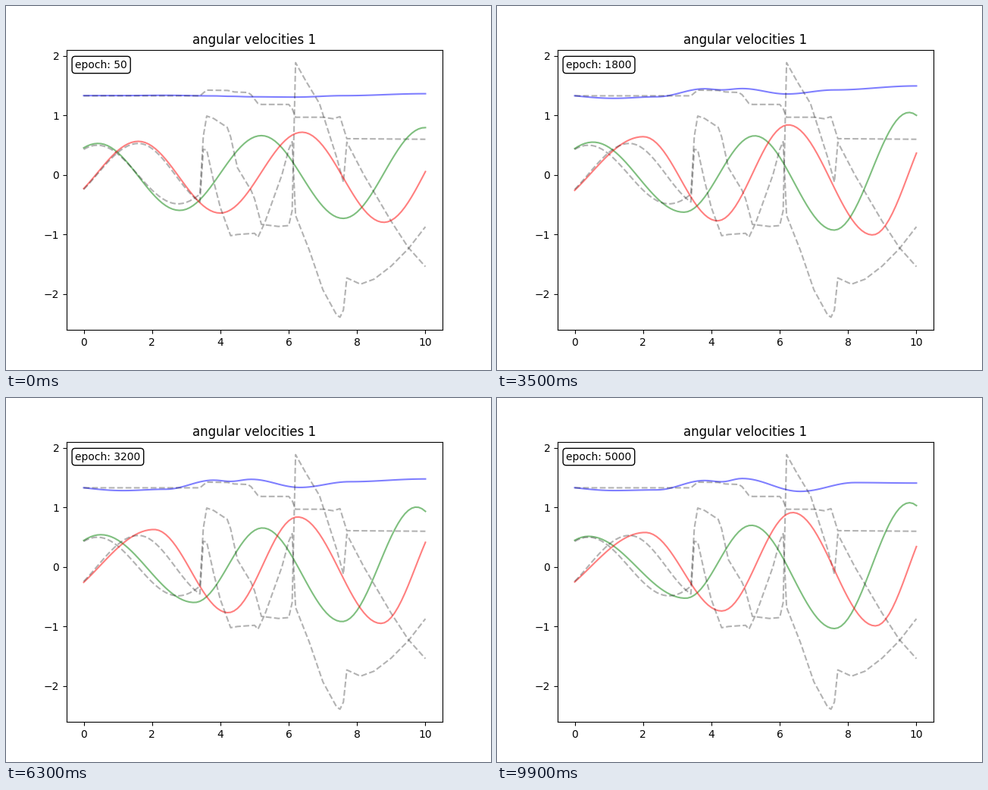
Recreate the animation shown at these times as a matplotlib script. Size 640 px wide and 480 px high, loop 10 s.

```python
import numpy as np
import matplotlib.pyplot as plt
from matplotlib.animation import FuncAnimation

FRAMES, INTERVAL = 100, 100
EPOCH_STEP = 50
IMPACT = 3.45
t = np.linspace(0, 10, 101)


def glide(points):
    """Half-cosine path through turning points, sampled at t."""
    x, y = points.T
    i = np.clip(np.searchsorted(x, t, side="right") - 1, 0, len(x) - 2)
    u = np.clip((t - x[i]) / (x[i + 1] - x[i]), 0, 1)
    return y[i] + (y[i + 1] - y[i]) * (1 - np.cos(np.pi * u)) / 2


def swing(x0, half, y0, growth, count):
    """Turning points of an evenly growing oscillation."""
    k = np.arange(-1, count - 1)
    return np.column_stack([x0 + half * k, (-1.0)**k * (y0 + growth * k)])


def settle(early, mid, late, frame):
    """Move quickly from early to mid, then ease towards late."""
    a = 1 - np.exp(-frame / 17)
    b = np.sin(np.pi / 2 * np.clip((frame - 54) / 45, 0, 1))
    return early + (mid - early) * a + (late - mid) * b


def surge(points, frame):
    """Temporary overshoot and lag of the later turning points."""
    s = .4 * np.exp(-((frame - 22) / 11)**2)
    x, y = points.T
    s = s * np.clip((x - 4) / 4, 0, 1)
    return np.column_stack([x + s / 2, y * (1 + s)])


# Turning points of the predicted velocities
green = (
    swing(.42, 2.39, .53, .065, 7),
    np.array([(-1.7, -.25), (.55, .555), (3.25, -.63), (5.26, .635),
              (7.54, -.87), (9.7, .98), (11.9, -1)]),
    np.array([(-1.7, -.25), (.4, .515), (3.25, -.525), (5.17, .7),
              (7.6, -1.035), (9.8, 1.08), (11.9, -1.1)]),
)
red = (
    swing(1.6, 2.394, .565, .075, 6),
    np.array([(-1.1, -.6), (2.07, .655), (4.2, -.785), (6.2, .81),
              (8.65, -.935), (10.7, .95)]),
    np.array([(-1.15, -.58), (2.07, .58), (4.3, -.74), (6.38, .915),
              (8.8, -.99), (10.75, .98)]),
)
blue_mid = np.array([(-1, 1.37), (1.15, 1.281), (2.4, 1.31), (3.8, 1.466),
                     (4.3, 1.445), (4.9, 1.472), (6.2, 1.368), (7.6, 1.443),
                     (10, 1.515)])
blue_late = np.array([(-1, 1.37), (1.15, 1.284), (2.4, 1.295), (3.8, 1.453),
                      (4.3, 1.432), (4.9, 1.487), (6.6, 1.27), (8.2, 1.418),
                      (10, 1.41)])
bx = blue_mid[:, 0]
blue_early = np.column_stack([bx, 1.33 + .004 * bx * np.sin(.82 * (bx - 7.5))])
blue = (blue_early, blue_mid, blue_late)

# Measured velocities: smooth swings, then kicks at each impact
kicks_b = [(0, 1.33), (3.4, 1.33), (3.6, 1.425), (4.25, 1.42), (4.4, 1.395),
           (4.85, 1.385), (5.1, 1.2), (5.2, 1.185), (6.05, 1.185), (6.2, .97),
           (7, .97), (7.3, .945), (7.5, .98), (7.7, .61), (10, .6)]
kicks_g = [(3.5, .65), (3.6, .99), (3.8, .95), (4.2, .8), (4.3, .64),
           (4.5, .12), (4.9, -.26), (5, -.4), (5.2, -.83), (5.7, -.865),
           (6, -.85), (6.1, -.6), (6.2, 1.887), (6.5, 1.58), (6.9, 1.2),
           (7.4, .3), (7.6, -.12), (7.7, .55), (8.2, 0), (9, -.78),
           (9.5, -1.22), (10, -1.54)]
kicks_r = [(3.5, .43), (3.6, .42), (3.8, -.1), (4, -.55), (4.3, -1.02),
           (4.5, -1), (5, -.98), (5.1, -1.045), (5.3, -.8), (5.8, 0),
           (6, .43), (6.1, .56), (6.2, -.68), (6.6, -1.26), (7, -1.93),
           (7.4, -2.35), (7.5, -2.39), (7.6, -2.27), (7.7, -1.73),
           (8.1, -1.835), (8.5, -1.75), (9, -1.53), (9.5, -1.24), (10, -.87)]


def path(points):
    return np.interp(t, *np.array(points).T)


def measured(turns, kicks):
    return np.where(t < IMPACT, glide(turns), path(kicks))


truth = [path(kicks_b),
         measured(swing(.4, 2.36, .5, -.015, 4), kicks_g),
         measured(np.array([(-.8, -.5), (1.6, .53), (3.75, -.52)]), kicks_r)]

fig, ax = plt.subplots(figsize=(6.4, 4.8), dpi=100)
ax.set_title("angular velocities 1", pad=5.5)
ax.set_xlim(-.5, 10.5)
ax.set_ylim(-2.604, 2.105)

lines = []
for color, y in zip("bgr", truth):
    lines += ax.plot(t, np.zeros_like(t), color, alpha=.5)
    ax.plot(t, y, "k--", alpha=.3)
label = ax.text(-.25, 1.8, "", bbox=dict(boxstyle="round", fc="white", ec="black"))


def update(frame):
    lines[0].set_ydata(glide(settle(*blue, frame)))
    for line, poses in zip(lines[1:], (green, red)):
        line.set_ydata(glide(surge(settle(*poses, frame), frame)))
    label.set_text(f"epoch: {EPOCH_STEP * (frame + 1)}")
    return lines + [label]


anim = FuncAnimation(fig, update, frames=FRAMES, interval=INTERVAL,
                     repeat=True, repeat_delay=0)
plt.show()
```
